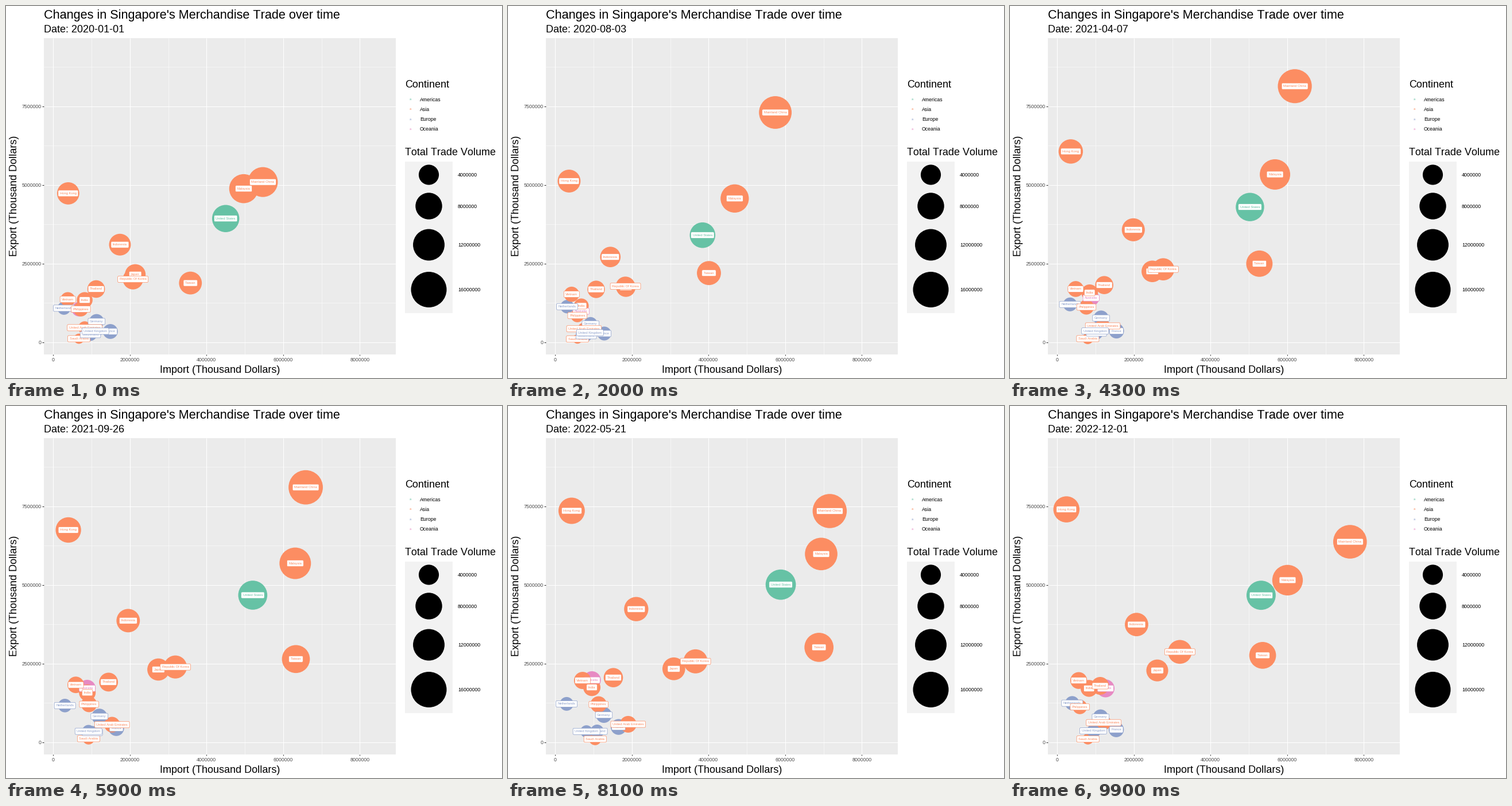
A matplotlib script for the animation above (10000 ms loop, 864 px wide and 648 px high).

```python
import numpy as np
import matplotlib.pyplot as plt
from matplotlib.animation import FuncAnimation
from matplotlib.patches import Circle, Rectangle

plt.rcParams["font.family"] = "Liberation Sans"
plt.rcParams["text.kerning_factor"] = 6  # practically no kerning

W, H = 864, 648
FRAMES, INTERVAL = 100, 100
START, DAYS, MONTHS = np.datetime64("2020-01-01"), 1065, 35

# Panel edges and scales, in pixels (per million dollars)
LEFT, RIGHT, TOP, BOTTOM = 66, 678.5, 55.5, 606.5
X0, Y0, SX, SY = 82.3, 585.6, 66.75, 54.8

COLORS = {"Americas": "#66C2A5", "Asia": "#FC8D62",
          "Europe": "#8DA0CB", "Oceania": "#E78AC3"}
LABEL = 5.69

rng = np.random.default_rng(7)
fig = plt.figure(figsize=(W / 72, H / 72), dpi=72, facecolor="white")
ax = fig.add_axes([0, 0, 1, 1])
ax.set(xlim=(0, W), ylim=(H, 0))
ax.axis("off")


def px(imports):
    return X0 + imports * SX


def py(exports):
    return Y0 - exports * SY


def radius(volume):
    return 5.4 + 6.5 * np.sqrt(max(volume - 0.5, 0))


def write(x, y, s, size=8.8, color="black", **kw):
    return ax.text(x, y, s, size=size, color=color, va="baseline", **kw)


def box(x0, y0, x1, y1, color):
    return ax.add_patch(Rectangle((x0, y0), x1 - x0, y1 - y0, fc=color, lw=0))


def line(x0, y0, x1, y1, color="white", lw=1.07):
    ax.plot([x0, x1], [y0, y1], color=color, lw=lw, solid_capstyle="butt")


def disc(x, y, r, color, **kw):
    return ax.add_patch(Circle((x, y), r, fc=color, lw=0, **kw))


# Panel, grid and axes
panel = box(LEFT, TOP, RIGHT, BOTTOM, "#EBEBEB")
for i in range(4):
    x, y = px(2 * i + 1), py(2.5 * i + 1.25)
    line(x, TOP, x, BOTTOM, lw=0.53)
    line(LEFT, y, RIGHT, y, lw=0.53)
for i in range(5):
    x = px(2 * i)
    line(x, TOP, x, BOTTOM)
    line(x, BOTTOM, x, BOTTOM + 2.75, "#333333")
    write(x, 619, f"{i * 2000000}", color="#4D4D4D", ha="center")
for i in range(4):
    y = py(2.5 * i)
    line(LEFT, y, RIGHT, y)
    line(LEFT - 2.75, y, LEFT, y, "#333333")
    write(61.3, y + 3.15, f"{i * 2500000}", color="#4D4D4D", ha="right")

write(LEFT, 22, "Changes in Singapore's Merchandise Trade over time", 21.6)
date = write(LEFT, 46, "", 18)
write((LEFT + RIGHT) / 2, 638.7, "Import (Thousand Dollars)", 18, ha="center")
write(19.5, (TOP + BOTTOM) / 2, "Export (Thousand Dollars)", 18,
      rotation=90, rotation_mode="anchor", ha="center")

# Legends
write(695, 142, "Continent", 18)
for i, (name, color) in enumerate(COLORS.items()):
    y = 162.4 + 17.28 * i
    write(704, y + 1.6, "a", LABEL, color, ha="center")
    write(721, y + 3.15, name)

write(695, 260.3, "Total Trade Volume", 18)
box(695.3, 271, 778, 535, "#F2F2F2")
for volume, y in ((4, 294), (8, 348.5), (12, 416), (16, 494)):
    disc(736.5, y, radius(volume), "black")
    write(787, y + 3.15, f"{volume}000000")


class Bubble:
    """Drifts from start to end (imports, exports in millions of thousands).

    On top come a dip in 2020, a later boom and a little monthly noise.
    """

    def __init__(self, name, group, start, end, boost=(0.15, 0.1), lag=3, dip=0.18):
        self.start, self.end, self.boost = map(np.array, (start, end, boost))
        self.lag, self.dip = lag, dip
        self.noise = rng.normal(0, 0.03, (2, MONTHS + 1))
        self.noise[:, [0, -1]] = 0
        color = COLORS[group]
        self.disc = disc(0, 0, 1, color, zorder=3)
        self.disc.set_clip_path(panel)
        style = f"round,pad={3 / LABEL},rounding_size={1.8 / LABEL}"
        self.label = ax.text(0, 0, name, size=LABEL, color=color, zorder=4,
                             ha="center", va="center",
                             bbox=dict(boxstyle=style, fc="white", ec=color, lw=0.7))

    def move(self, s):
        trade = self.start + (self.end - self.start) * s
        trade = trade + self.boost * np.sin(np.pi * s ** self.lag)
        trade *= 1 - self.dip * np.sin(np.pi * min(s / 0.4, 1))
        month = s * MONTHS
        wobble = [np.interp(month, range(MONTHS + 1), row) for row in self.noise]
        trade += wobble * np.sqrt(trade)
        center = px(trade[0]), py(trade[1])
        self.disc.center = center
        self.disc.radius = radius(trade.sum())
        self.label.set_position(center)


# Alphabetical, so later names lie on top
bubbles = [
    Bubble("Australia", "Oceania", (0.67, 1.05), (1.26, 1.71), boost=(-0.2, 0.4)),
    Bubble("France", "Europe", (1.49, 0.34), (1.54, 0.4)),
    Bubble("Germany", "Europe", (1.13, 0.66), (1.13, 0.8)),
    Bubble("Hong Kong", "Asia", (0.39, 4.73), (0.24, 7.4), boost=(0.15, 0.5), dip=0.03),
    Bubble("India", "Asia", (0.82, 1.34), (0.83, 1.71)),
    Bubble("Indonesia", "Asia", (1.74, 3.1), (2.07, 3.74), boost=(0.1, 0.6)),
    Bubble("Japan", "Asia", (2.14, 2.15), (2.61, 2.28), boost=(0.6, 0.1)),
    Bubble("Mainland China", "Asia", (5.47, 5.09), (7.64, 6.37),
           boost=(-0.2, 2.6), lag=0.8, dip=0),
    Bubble("Malaysia", "Asia", (4.97, 4.88), (6.01, 5.15), boost=(1.2, 0.9), dip=0.1),
    Bubble("Netherlands", "Europe", (0.28, 1.08), (0.39, 1.24), boost=(-0.07, 0), dip=0),
    Bubble("Philippines", "Asia", (0.72, 1.05), (0.59, 1.12), boost=(0.5, 0.15)),
    Bubble("Republic Of Korea", "Asia", (2.08, 2), (3.2, 2.87), boost=(0.7, -0.15)),
    Bubble("Saudi Arabia", "Asia", (0.67, 0.11), (0.8, 0.1), boost=(0.25, 0)),
    Bubble("Switzerland", "Europe", (0.97, 0.24), (0.97, 0.36), boost=(0.1, 0)),
    Bubble("Taiwan", "Asia", (3.58, 1.88), (5.36, 2.76), boost=(2.1, 0.4), lag=2.2, dip=0),
    Bubble("Thailand", "Asia", (1.12, 1.69), (1.12, 1.79), boost=(0.4, 0.2), dip=0),
    Bubble("United Arab Emirates", "Asia", (0.82, 0.46), (1.21, 0.62), boost=(0.8, 0)),
    Bubble("United Kingdom", "Europe", (1.1, 0.35), (0.94, 0.36), boost=(-0.15, 0)),
    Bubble("United States", "Americas", (4.5, 3.93), (5.32, 4.67), boost=(0.6, 0.45)),
    Bubble("Vietnam", "Asia", (0.38, 1.36), (0.56, 1.96), dip=0),
]


def update(i):
    s = i / (FRAMES - 1)
    date.set_text(f"Date: {START + i * DAYS // (FRAMES - 1)}")
    for bubble in bubbles:
        bubble.move(s)


anim = FuncAnimation(fig, update, frames=FRAMES, interval=INTERVAL,
                     repeat=True, repeat_delay=0)
plt.show()
```
